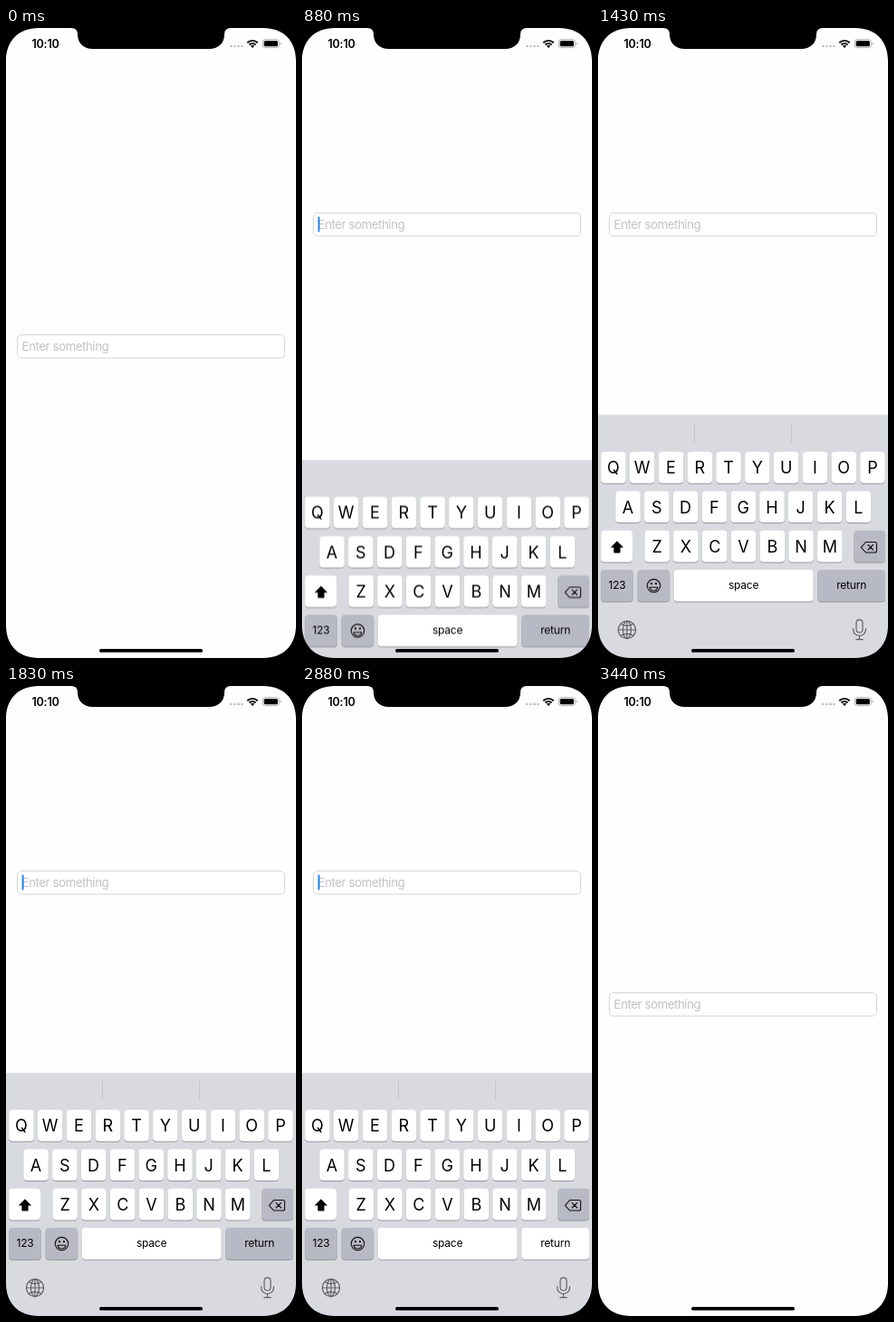
An HTML page for the animation above (3.55 s loop, 320 by 693 pixels).

```html
<!DOCTYPE html>
<html lang="en">
<head>
<meta charset="utf-8">
<title>Keyboard avoidance</title>
<style>
  html, body { margin: 0; width: 100%; height: 100%; overflow: hidden; background: #fff; }
  svg { display: block; width: 320px; height: 693px; font-family: Inter, Roboto, sans-serif; }
  .loop { animation: 3550ms step-end infinite; }

  #field { animation-name: lift; }
  #caret { animation-name: blink; }
  #keyboard { animation-name: slide; }
  #return { animation-name: press; }
  #dividers { animation-name: show; }

  @keyframes lift {
    0% { transform: none; }
    21.97% { transform: translateY(-134px); }
    83.66%, 100% { transform: none; }
  }

  /* critically damped spring, sampled at the screen refreshes */
  @keyframes slide {
    0% { transform: translateY(270px); }
    21.97% { transform: translateY(166.5px); }
    24.78% { transform: translateY(49.5px); }
    27.88% { transform: translateY(10.2px); }
    31.26% { transform: translateY(1.5px); }
    34.08% { transform: none; }
    83.66% { transform: translateY(16.8px); }
    87.32% { transform: translateY(232.5px); }
    90.7% { transform: translateY(264.2px); }
    93.8%, 100% { transform: translateY(270px); }
  }

  @keyframes blink {
    0% { opacity: 0; }
    21.97% { opacity: 1; }
    34.08% { opacity: .75; }
    36.61% { opacity: .3; }
    40.28% { opacity: 0; }
    49.85% { opacity: .5; }
    51.54% { opacity: 1; }
    62.25% { opacity: .75; }
    65.35% { opacity: .3; }
    68.45% { opacity: 0; }
    77.74% { opacity: .5; }
    81.12% { opacity: 1; }
    83.66%, 100% { opacity: 0; }
  }

  @keyframes press {
    0% { fill: #b7bac4; }
    81.12% { fill: #fff; }
    83.66%, 100% { fill: #b7bac4; }
  }

  @keyframes show {
    0% { opacity: 0; }
    34.08%, 100% { opacity: 1; }
  }

  .key { fill: #fff; }
  .dim { fill: #b7bac4; }
  .shade { fill: #95979c; }
  .letter { font-size: 18px; text-anchor: middle; }
  .label { font-size: 12px; letter-spacing: -.2px; text-anchor: middle; }
  .line { fill: none; stroke-linecap: round; stroke-linejoin: round; }
</style>
</head>
<body>
<svg viewBox="0 0 320 693">
  <rect width="320" height="693" fill="#fefefe"/>

  <g id="field" class="loop">
    <rect x="12.5" y="337.5" width="295" height="25.5" rx="4.5" fill="#fff" stroke="#d4d4d6"/>
    <text x="17.6" y="355" font-size="13.3" letter-spacing="-.45" fill="#c3c3c6">Enter something</text>
    <rect id="caret" class="loop" x="17.6" y="341.5" width="1.9" height="17" rx=".9" fill="#1f83f5"/>
  </g>

  <g id="keyboard" class="loop">
    <rect y="425.5" width="320" height="280" fill="#d8dadf"/>
    <path id="dividers" class="loop" d="M106.5 434v22M213.5 434v22" stroke="#c6c8cd"/>
    <g id="keys"></g>

    <path d="M21 564.2l7.2 7.2h-3.6v5.2q0 1-1 1h-5.2q-1 0-1-1v-5.2h-3.6z"/>
    <g class="line" stroke="#111" stroke-width="1.1">
      <path d="M295.5 565.5h10q2 0 2 2v7.5q0 2-2 2h-10l-5.2-5.7zM298 568.4l5.6 5.6M303.6 568.4l-5.6 5.6"/>
      <circle cx="61.5" cy="613.6" r="7.2"/>
      <path d="M57 615.2h9q-.8 3.8-4.5 3.8t-4.5-3.8z"/>
    </g>
    <circle cx="59" cy="611.2" r="1.1"/>
    <circle cx="64" cy="611.2" r="1.1"/>

    <g class="line" stroke="#5c5f65" stroke-width="1.15">
      <circle cx="32" cy="662" r="9.6"/>
      <ellipse cx="32" cy="662" rx="4.5" ry="9.6"/>
      <path d="M32 652.4v19.2M22.4 662h19.2M25 655.6q7 4 14 0M25 668.4q7-4 14 0"/>
      <rect x="285" y="650.8" width="7" height="14.2" rx="3.5"/>
      <path d="M281.6 660.5v1.4a6.9 6.6 0 0 0 13.8 0v-1.4M288.5 668.5v4M284.8 672.6h7.4"/>
    </g>
  </g>

  <text x="28.4" y="22" font-size="12.6" font-weight="600" letter-spacing="-.2">10:10</text>
  <g fill="#bdbdbf">
    <circle cx="248.3" cy="20" r="1.3"/>
    <circle cx="252.4" cy="20" r="1.3"/>
    <circle cx="256.5" cy="20" r="1.3"/>
    <circle cx="260.6" cy="20" r="1.3"/>
  </g>
  <g class="line" stroke="#000" stroke-width="1.9" style="stroke-linecap:butt">
    <path d="M266.3 16.2a8.2 8.2 0 0 1 11.4 0M268.5 18.5a5 5 0 0 1 7 0"/>
  </g>
  <path d="M272 21.9l-2.1-2.1a3 3 0 0 1 4.2 0z"/>
  <rect x="283.3" y="12.6" width="18" height="9" rx="2.6" fill="none" stroke="#a9a9ab" stroke-width=".9"/>
  <rect x="284.7" y="14" width="15.2" height="6.2" rx="1.5"/>
  <path d="M302.6 15.6q1.2.4 1.2 1.5t-1.2 1.5z" fill="#a9a9ab"/>

  <path d="M72 0q7 0 7 7C79 17 86 23 96 23H224C234 23 241 17 241 7q0-7 7-7z"/>
  <path fill-rule="evenodd" d="M0 0H320V693H0zM36 0H284C306 0 320 14 320 36V657C320 679 306 693 284 693H36C14 693 0 679 0 657V36C0 14 14 0 36 0z"/>
  <rect x="103" y="683" width="114" height="3.8" rx="1.9"/>
</svg>
<script>
  const PITCH = 31.78, ROW = 43.3, TOP = 466.2, HEIGHT = 34.6;
  const keys = document.getElementById('keys');

  function add(name, attrs, text = '') {
    const el = document.createElementNS('http://www.w3.org/2000/svg', name);
    for (const k in attrs) el.setAttribute(k, attrs[k]);
    el.textContent = text;
    keys.append(el);
    return el;
  }

  function key(row, x, width, text, cls, textCls) {
    const y = TOP + row * ROW;
    const box = { x, width, height: HEIGHT, rx: 4 };
    add('rect', { ...box, y: y + 1, class: 'shade' });
    const face = add('rect', { ...box, y, class: cls });
    const drop = textCls === 'letter' ? 24.1 : 21.2;
    if (text) add('text', { x: x + width / 2, y: y + drop, class: textCls }, text);
    return face;
  }

  [['QWERTYUIOP', 3.2], ['ASDFGHJKL', 19.3], ['ZXCVBNM', 51.4]].forEach(([chars, left], row) =>
    [...chars].forEach((c, i) => key(row, left + i * PITCH, 27.5, c, 'key', 'letter')));

  key(2, 3.2, 34.8, '', 'key');
  key(2, 282.2, 34.8, '', 'dim');
  key(3, 3.2, 35.6, '123', 'dim', 'label');
  key(3, 43.6, 35.6, '', 'dim');
  key(3, 83.6, 154, 'space', 'key', 'label');
  const enter = key(3, 242.2, 74.8, 'return', 'dim loop', 'label');
  enter.id = 'return';
</script>
</body>
</html>
```
